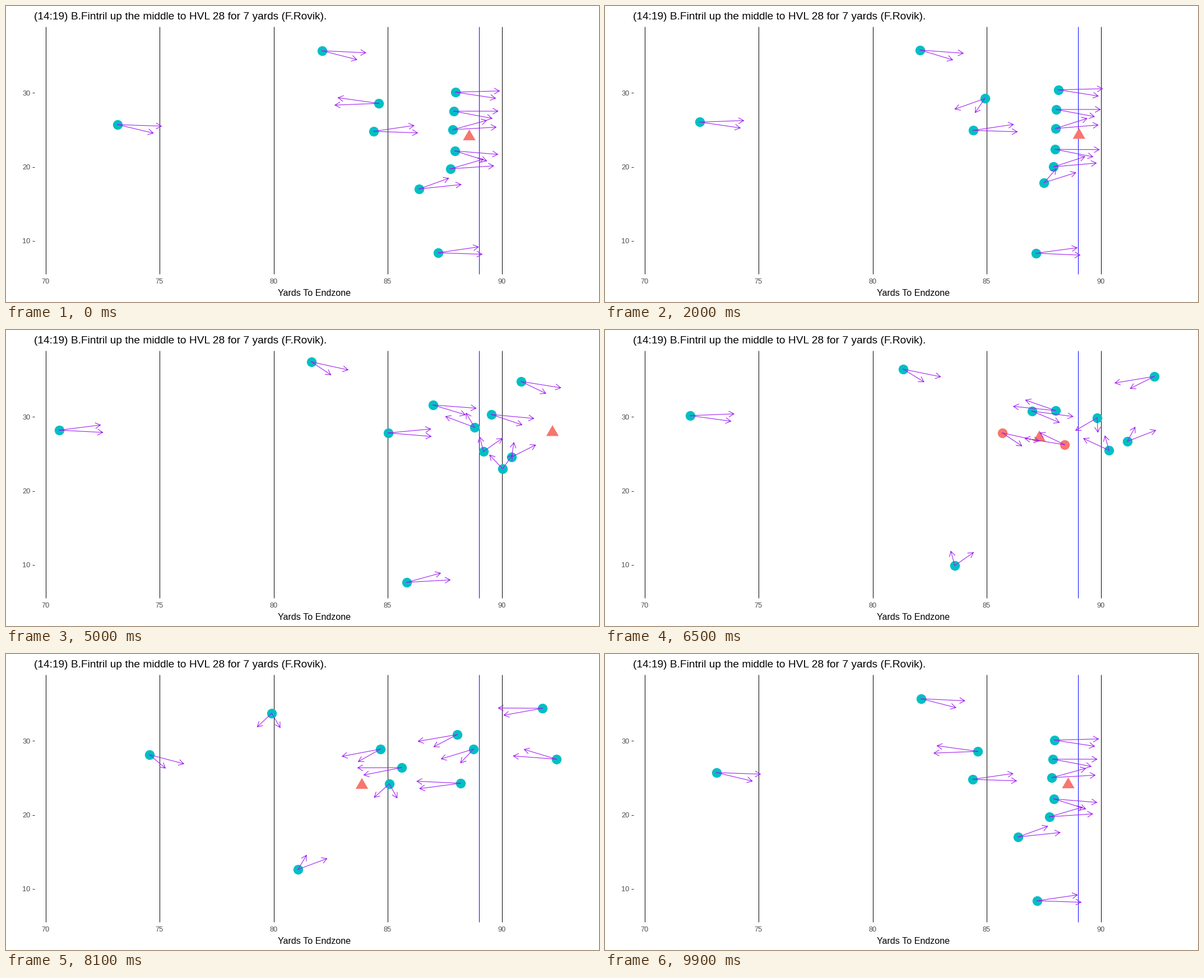
These frames come from a looping animation (1058x529 px, 10 s). A matplotlib script:

```python
import numpy as np
import matplotlib.pyplot as plt
from matplotlib.animation import FuncAnimation

W, H, DPI = 1058, 529, 100
PX = 72 / DPI                       # points per pixel
YARD_X, YARD_Y = 40.68, 13.27       # pixels per yard on each axis
TEAL, SALMON, PURPLE = "#00BFC4", "#F8766D", "#A020F0"
SIGHT, HALF_CONE = 1.93, 15         # length and half angle of the view arrows
BALL_R = 8.3
KNOTS = np.array([0, 3.4, 5, 6.5, 8.1, 9.7])
SET, MOTION = 3.5, 1.5              # start-up power: waiting or already moving

# Frames at which the pose advances; the last one jumps back to the start.
STEPS = np.array([0, 1, 2, 3, 4, *range(6, 51, 2), *range(51, 99, 2)])
RESET = 99


class Track:
    """Path through (x, y, heading) key points, closing in on a goal."""

    def __init__(self, *points, start=SET, goal=None, momentum=0.3):
        p = np.array(points, float)
        end = p[-1] + momentum * (p[-1] - p[-2])
        if goal is not None:
            end[:2] += 0.15 * (goal - p[-1, :2])
        self.p = np.vstack([p, end])
        self.start = start
        h = np.diff(KNOTS)[:, None]
        v = np.diff(self.p, axis=0) / h
        inner = (v[:-1] * h[1:] + v[1:] * h[:-1]) / (h[:-1] + h[1:])
        self.slope = np.vstack([0 * v[:1], inner, v[-1:] / 2])
        self.slope[1] = start * v[0]

    def at(self, time):
        i = min(np.searchsorted(KNOTS, time, "right") - 1, len(KNOTS) - 2)
        h = KNOTS[i + 1] - KNOTS[i]
        u = (time - KNOTS[i]) / h
        a, b = self.p[i], self.p[i + 1]
        if i == 0:
            return a + (b - a) * u ** self.start
        return (a + (b - a) * u * u * (3 - 2 * u) + h * u * (1 - u)
                * ((1 - u) * self.slope[i] - u * self.slope[i + 1]))


runner = Track((826.5, 233.5, 0), (949.5, 216.5, 0), (975, 183, 0),
               (775, 192.5, 0), (635, 234.5, 0), momentum=0.6)
defenders = []


def defend(*points, start=SET):
    defenders.append(Track(*points, start=start, goal=runner.p[-1, :2]))


# Backs
defend((199, 212, -21), (133, 202, 6), (95, 179, 6), (152, 153, -8),
       (256, 180, -54), start=MOTION)
defend((564, 80, -23), (554, 72, -54), (545, 57, -49), (532, 70, -47),
       (474, 106, -94))
defend((665, 174, 172), (693, 155, 328), (762, 134, 332), (762, 145, 323),
       (668, 170, 225), start=MOTION)
defend((656, 224, 9), (663, 213, 12), (682, 184, 1), (709, 184, -49),
       (684, 232, -95))
defend((771, 441, 9), (761, 446, -2), (715, 451, 25), (624, 421, 80),
       (521, 385, 64))
# Line, top to bottom
defend((802, 154, -10), (847, 127, -14), (919, 92, -41), (980, 83, -138),
       (957, 97, -166))
defend((799, 188, -15), (837, 168, -15), (866, 151, -31), (878, 157, -104),
       (834, 170, -122))
defend((797, 221, 25), (839, 208, 53), (836, 174, 116), (804, 144, 148),
       (805, 144, 223))
defend((801, 259, -29), (815, 241, 53), (852, 217, 80), (820, 205, 139),
       (706, 203, 196))
defend((793, 291, 27), (841, 268, 47), (902, 227, 72), (932, 199, 65),
       (982, 188, 152))
defend((737, 327, 33), (840, 302, 91), (886, 248, 92), (899, 215, 110),
       (811, 231, 187), start=MOTION)


def arrow(x, y, heading):
    """Open-headed arrow as a polyline ending in a gap."""
    a = np.radians(heading)
    tip = np.array([x + SIGHT * YARD_X * np.cos(a),
                    y - SIGHT * YARD_Y * np.sin(a)])
    back = np.arctan2(y - tip[1], x - tip[0])
    barbs = [tip + 10 * np.array([np.cos(back + s), np.sin(back + s)])
             for s in (-np.pi / 6, np.pi / 6)]
    gap = (np.nan, np.nan)
    return [(x, y), tip, gap, barbs[0], tip, barbs[1], gap]


def sees_runner(x, y, heading, ball):
    dx, dy = (ball[0] - x) / YARD_X, (y - ball[1]) / YARD_Y
    off = (np.degrees(np.arctan2(dy, dx)) - heading + 180) % 360 - 180
    return np.hypot(dx, dy) < 2 and abs(off) < 40


plt.rcParams["font.family"] = "Liberation Sans"
fig = plt.figure(figsize=(W / DPI, H / DPI), dpi=DPI, facecolor="white")
ax = fig.add_axes([0, 0, 1, 1])
ax.set(xlim=(0, W), ylim=(H, 0))
ax.axis("off")


def label(x, y, text, size, **kw):
    ax.text(x, y, text, fontsize=size * PX, va="baseline", **kw)


def rule(xs, ys, color):
    ax.plot(xs, ys, color=color, lw=PX, solid_capstyle="butt", zorder=1)


def yard_line(yard, color):
    x = int(70.5 + (yard - 70) * YARD_X) + 0.5
    rule([x, x], [36.5, 478.5], color)
    return x


label(50, 23.5, "(14:19) B.Fintril up the middle to HVL 28 for 7 yards "
      "(F.Rovik).", 19.2, color="black")
label(550, 518, "Yards To Endzone", 16.1, color="black", ha="center")
for yard in range(70, 91, 5):
    x = yard_line(yard, "black")
    label(x, 496.5, str(yard), 12.8, color="#4D4D4D", ha="center")
yard_line(89, "blue")
for mark in (10, 20, 30):
    y = int(552.5 - mark * YARD_Y) + 0.5
    rule([46.5, 50.5], [y, y], "#333333")
    label(43.5, y + 5, str(mark), 12.8, color="#4D4D4D", ha="right")


def dots(color):
    return ax.plot([], [], "o", ms=17.4 * PX, mew=0, color=color, zorder=2)[0]


free, near = dots(TEAL), dots(SALMON)
corners = np.radians([-90, 30, 150])
triangle = 1.555 * BALL_R * np.column_stack([np.cos(corners), np.sin(corners)])
ball_mark = plt.Polygon(triangle, fc=SALMON, lw=0, zorder=3)
ax.add_patch(ball_mark)
sight, = ax.plot([], [], color=PURPLE, lw=1.1 * PX, zorder=4)


def update(frame):
    time = 0 if frame >= RESET else STEPS[STEPS <= frame].max() / 10
    ball = runner.at(time)[:2]
    poses = np.array([d.at(time) for d in defenders])
    seen = np.array([sees_runner(*p, ball) for p in poses])
    free.set_data(*poses[~seen, :2].T)
    near.set_data(*poses[seen, :2].T)
    ball_mark.set_xy(ball + triangle)
    lines = [pt for x, y, a in poses for side in (-HALF_CONE, HALF_CONE)
             for pt in arrow(x, y, a + side)]
    sight.set_data(*np.array(lines).T)
    return free, near, ball_mark, sight


anim = FuncAnimation(fig, update, frames=100, interval=100, repeat=True,
                     repeat_delay=0, blit=False)
plt.show()
```
